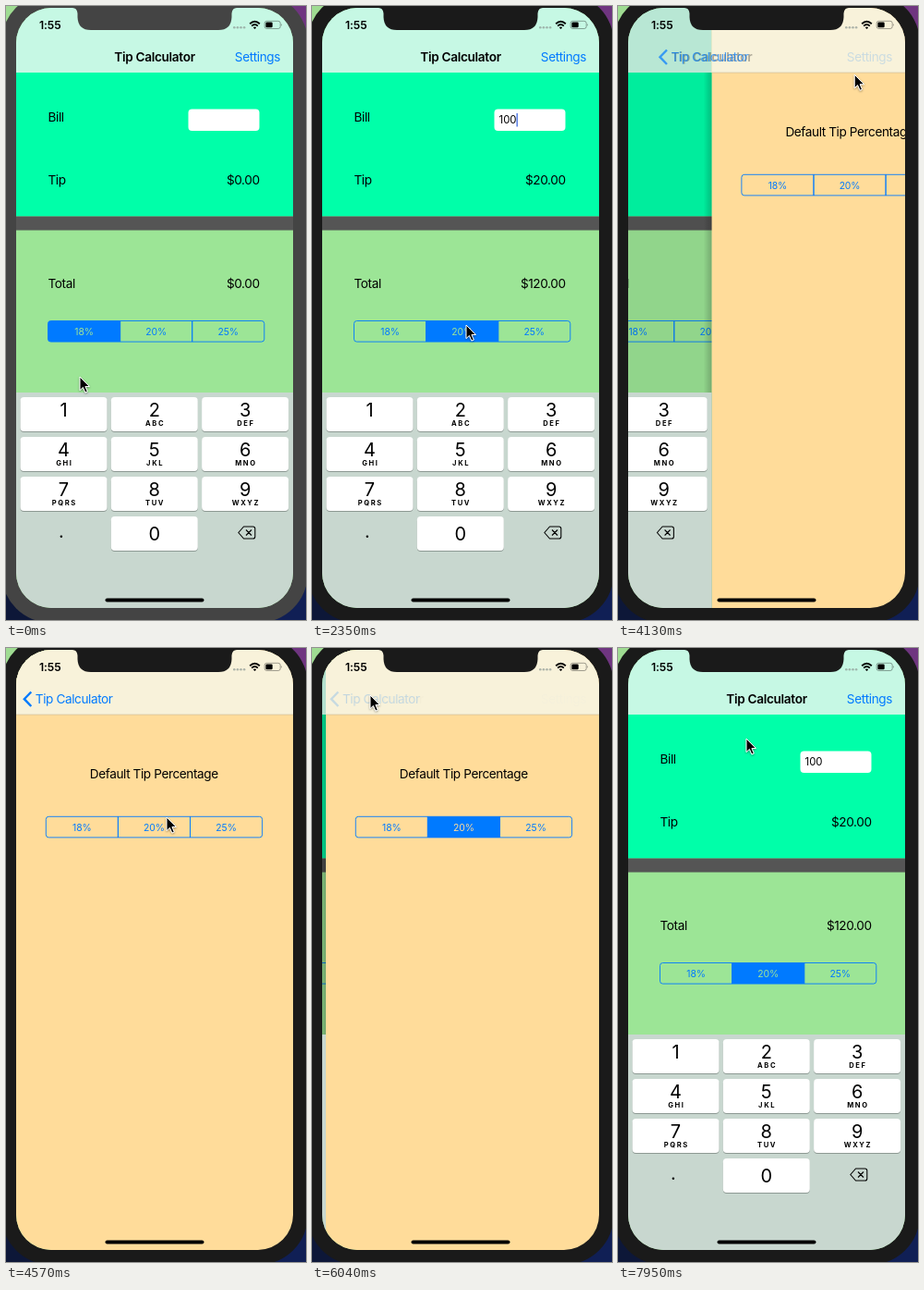
Animation, 325 px wide and 664 px high, one loop 8000 ms. Source, as an HTML page:

```html
<!DOCTYPE html>
<html lang="en">
<head>
<meta charset="utf-8">
<title>Tip calculator demo</title>
<style>
  html, body { margin: 0; width: 100%; height: 100%; overflow: hidden; background: #1a1a1a; }
  svg { display: block; width: 325px; height: 664px; }
  text { font: 13.6px Inter, sans-serif; letter-spacing: -.4px; white-space: pre; }
  .bold { font-weight: 600; letter-spacing: -.3px; }
  .blue { fill: #007aff; }
  .end { text-anchor: end; }
  .mid { text-anchor: middle; }
  .small { font-size: 10.4px; letter-spacing: -.1px; }
  .digit { font-size: 20px; letter-spacing: 0; }
  .letters { font-size: 7.6px; font-weight: 700; letter-spacing: 1.6px; }
</style>
</head>
<body>
<svg viewBox="0 0 325 664">
  <defs>
    <clipPath id="screen"><rect x="11" y="2" width="300" height="649" rx="38"/></clipPath>
    <linearGradient id="edge"><stop offset="0" stop-opacity="0"/><stop offset="1" stop-opacity=".2"/></linearGradient>
    <filter id="soft" x="-50%" y="-50%" width="200%" height="200%"><feDropShadow dx="0" dy="1" stdDeviation="1" flood-opacity=".4"/></filter>
  </defs>

  <!-- wallpaper corners and phone body -->
  <rect width="160" height="330" fill="#9fdc92"/>
  <rect x="160" width="165" height="330" fill="#6f3580"/>
  <rect y="330" width="160" height="334" fill="#0d1738"/>
  <rect x="160" y="330" width="165" height="334" fill="#101f55"/>
  <rect class="body" x="-5" y="-14" width="332" height="681" rx="54"/>

  <g clip-path="url(#screen)">
    <g id="main">
      <rect x="11" y="2" width="300" height="649" fill="#9ce596"/>
      <rect x="11" y="2" width="300" height="70" fill="#c6f8e4"/>
      <rect x="11" y="72" width="300" height="155.5" fill="#00ffa9"/>
      <rect x="11" y="227.5" width="300" height="15" fill="#555"/>
      <text x="45.5" y="125">Bill</text>
      <text x="45.5" y="193">Tip</text>
      <text x="45.5" y="305">Total</text>
      <rect x="197.5" y="111.5" width="77" height="23.5" rx="4" fill="#fff"/>
      <text id="bill" x="202.5" y="127.2" style="font-size:11.4px;letter-spacing:0"/>
      <rect id="caret" y="116" width="1.3" height="14.5" fill="#3f6be0"/>
      <text id="tip" class="end" x="274.6" y="193"/>
      <text id="total" class="end" x="274.6" y="305"/>
      <g id="mainTabs"/>
      <rect id="dim" x="11" y="2" width="300" height="649"/>
    </g>

    <g id="settings">
      <rect id="shadow" x="302" y="72" width="9" height="579" fill="url(#edge)" transform="translate(-300)"/>
      <rect x="11" y="2" width="300" height="649" fill="#ffdc9a"/>
      <rect x="11" y="2" width="300" height="70" fill="#f8f2da"/>
      <rect x="11" y="71.7" width="300" height=".7" fill="#cdbf9c"/>
      <text class="mid" x="160.3" y="141">Default Tip Percentage</text>
      <g id="settingsTabs"/>
    </g>

    <text id="title" class="bold mid" x="161" y="60">Tip Calculator</text>
    <text id="link" class="blue end" x="297" y="60">Settings</text>
    <g id="back">
      <path d="M27.3 47.5 L19.8 55.2 L27.3 63" fill="none" stroke="#007aff" stroke-width="2.4"/>
      <text class="blue" x="31.8" y="60">Tip Calculator</text>
    </g>

    <g id="keyboard"><rect x="11" y="418" width="300" height="233" fill="#c8d7cf"/></g>

    <!-- status bar -->
    <text class="bold" x="36" y="25" style="font-size:12.2px;letter-spacing:-.1px">1:55</text>
    <g fill="#8f9b96" opacity=".7">
      <circle cx="247.3" cy="23.3" r="1.3"/><circle cx="250.9" cy="23.3" r="1.3"/>
      <circle cx="254.5" cy="23.3" r="1.3"/><circle cx="258.1" cy="23.3" r="1.3"/>
    </g>
    <g fill="none" stroke="#000" stroke-width="1.9">
      <path d="M264.2 19.2 Q269.5 14.2 274.8 19.2"/>
      <path d="M266.2 21.6 Q269.5 18.5 272.8 21.6"/>
    </g>
    <path d="M267.8 23.2 Q269.5 21.8 271.2 23.2 L269.5 25Z"/>
    <rect x="280.2" y="16.3" width="17" height="8.2" rx="2.3" fill="none" stroke="#000" stroke-opacity=".45" stroke-width=".8"/>
    <rect x="281.4" y="17.5" width="7.3" height="5.8" rx="1.2"/>
    <path d="M298.2 19 Q299.6 20.4 298.2 21.8Z" fill-opacity=".5"/>
    <rect x="107.5" y="640.4" width="107" height="4.2" rx="2.1"/>
  </g>
  <path class="body" d="M72 1 V2 Q77 2 77.5 8 V12 Q78 26 92 26 H230 Q244 26 244.5 12 V8 Q245 2 250 2 V1Z"/>

  <path id="cursor" d="M0 0 V14.6 L3.4 11.4 L5.9 17 L8.3 16 L5.9 10.5 H10.4Z" stroke="#fff" stroke-width="1" filter="url(#soft)"/>
</svg>

<script>
const LOOP = 8000, FIRST = 140, STEP = 147.3;
const WIDTH = 300;
const RATES = [18, 20, 25];
const el = id => document.getElementById(id);

// [time, value, ...]: eased between rows
const CURSOR = [
  [0, 80, 401], [140, 80, 401], [434, 64, 438], [650, 64, 438], [1023, 160, 561], [1470, 160, 561],
  [2060, 167, 345], [2500, 167, 345], [2800, 240, 346], [2950, 240, 346], [3530, 270, 56], [3980, 270, 56],
  [4555, 174, 183], [4870, 174, 183], [5740, 63, 51], [6040, 63, 51], [6615, 171, 353], [7070, 171, 353],
  [7940, 139, 98]
];
const LINK_FADE = [[3670, 1], [3820, .35], [3969, .5], [4110, .6]];
const BACK_FADE = [[5720, 1], [5880, .2]];

// [time, value]: held until the next row
const BILL = [[0, ''], [580, '1'], [1020, '10'], [1310, '100']];
const MAIN_TAB = [[0, 0], [2190, 1], [2790, 2], [6025, 1]];
const SETTINGS_TAB = [[0, -1], [4850, 1]];
const BODY = [[0, '#444'], [430, '#1a1a1a']];
const CARET = [[0, 0], [570, 1], [1800, 0], [2040, 1], [2490, 0], [3070, 1], [3520, 0], [6900, 1], [7500, 0]];

const held = (rows, t) => rows.filter(row => row[0] <= t).pop()[1];

function track(rows, t) {
  const next = rows.findIndex(row => row[0] > t);
  if (next === 0) return rows[0].slice(1);
  if (next < 0) return rows[rows.length - 1].slice(1);
  const a = rows[next - 1], b = rows[next];
  const x = (t - a[0]) / (b[0] - a[0]);
  const k = x * x * (3 - 2 * x);
  return a.slice(1).map((v, i) => v + (b[i + 1] - v) * k);
}

function slide(t, start) {
  const x = Math.min(1, Math.max(0, (t - start) / 450));
  return 1 - (1 - x) ** 3;
}

function tabs(id, x, y, ground) {
  const w = 78.1, h = 22.6, r = 3;
  const shapes = [
    `M${x + w} ${y}H${x + r}q-${r} 0 -${r} ${r}v${h - 2 * r}q0 ${r} ${r} ${r}H${x + w}Z`,
    `M${x + w} ${y}h${w}v${h}h-${w}Z`,
    `M${x + 2 * w} ${y}h${w - r}q${r} 0 ${r} ${r}v${h - 2 * r}q0 ${r} -${r} ${r}H${x + 2 * w}Z`
  ];
  el(id).innerHTML = RATES.map((rate, i) =>
    `<path d="${shapes[i]}" stroke="#007aff" stroke-width=".9"/>
     <text class="small mid" x="${x + w * (i + .5)}" y="${y + 15.2}">${rate}%</text>`).join('');
  return chosen => RATES.forEach((_, i) => {
    const [shape, label] = [el(id).children[2 * i], el(id).children[2 * i + 1]];
    shape.setAttribute('fill', i === chosen ? '#007aff' : 'none');
    label.setAttribute('fill', i === chosen ? ground : '#007aff');
  });
}

function buildKeyboard() {
  const letters = ['', 'ABC', 'DEF', 'GHI', 'JKL', 'MNO', 'PQRS', 'TUV', 'WXYZ'];
  const key = (col, row, digit, sub) => {
    const x = 15.5 + col * 98.3, y = 423 + row * 43;
    const cx = x + 47, base = row === 3 ? 25.5 : 20.5;
    return `<rect x="${x}" y="${y + 1}" width="94" height="37" rx="4" fill="#8d9993"/>
      <rect x="${x}" y="${y}" width="94" height="37" rx="4" fill="#fff"/>
      <text class="digit mid" x="${cx}" y="${y + base}">${digit}</text>
      <text class="letters mid" x="${cx + .8}" y="${y + 31.4}">${sub}</text>`;
  };
  el('keyboard').innerHTML += letters.map((sub, i) => key(i % 3, Math.floor(i / 3), i + 1, sub)).join('') +
    key(1, 3, 0, '') +
    `<text class="digit mid" x="60" y="575">.</text>
     <path d="M257.5 563H267.5q2.3 0 2.3 2.3v8.4q0 2.3 -2.3 2.3H257.5L251.8 569.5ZM260 566.5l6 6m0 -6l-6 6"
       fill="none" stroke="#000" stroke-width="1.1" stroke-linejoin="round"/>`;
}

const pickMain = tabs('mainTabs', 45.5, 340.5, '#9ce596');
const pickSettings = tabs('settingsTabs', 43.3, 182.3, '#ffdc9a');
buildKeyboard();

const money = value => '$' + value.toFixed(2);
const shift = (id, x, y = 0) => el(id).setAttribute('transform', `translate(${x} ${y})`);
const fade = (id, opacity) => el(id).setAttribute('opacity', opacity);

function draw(t) {
  const open = slide(t, 3969) - slide(t, 6030);
  const bill = held(BILL, t), tab = held(MAIN_TAB, t);
  const tip = bill * RATES[tab] / 100;

  el('bill').textContent = bill;
  el('tip').textContent = money(tip);
  el('total').textContent = money(+bill + tip);
  el('caret').setAttribute('x', 202.5 + el('bill').getComputedTextLength());
  fade('caret', held(CARET, t));
  pickMain(tab);
  pickSettings(held(SETTINGS_TAB, t));

  shift('main', -.3 * WIDTH * open);
  fade('dim', .1 * open);
  shift('settings', WIDTH * (1 - open));
  fade('shadow', open > 0 && open < 1 ? 1 : 0);
  shift('keyboard', -WIDTH * open);
  shift('title', -85 * open);
  fade('title', 1 - open);
  fade('link', (1 - open) * (t < 5000 ? track(LINK_FADE, t)[0] : 1));
  shift('back', 85 * (1 - open));
  fade('back', open * track(BACK_FADE, t)[0]);

  document.querySelectorAll('.body').forEach(part => part.setAttribute('fill', held(BODY, t)));
  shift('cursor', ...track(CURSOR, t));
}

function frame(now) {
  const t = now % LOOP;
  draw(t < FIRST ? 0 : FIRST + Math.floor((t - FIRST) / STEP) * STEP);
  requestAnimationFrame(frame);
}
draw(0);
requestAnimationFrame(frame);
</script>
</body>
</html>
```
